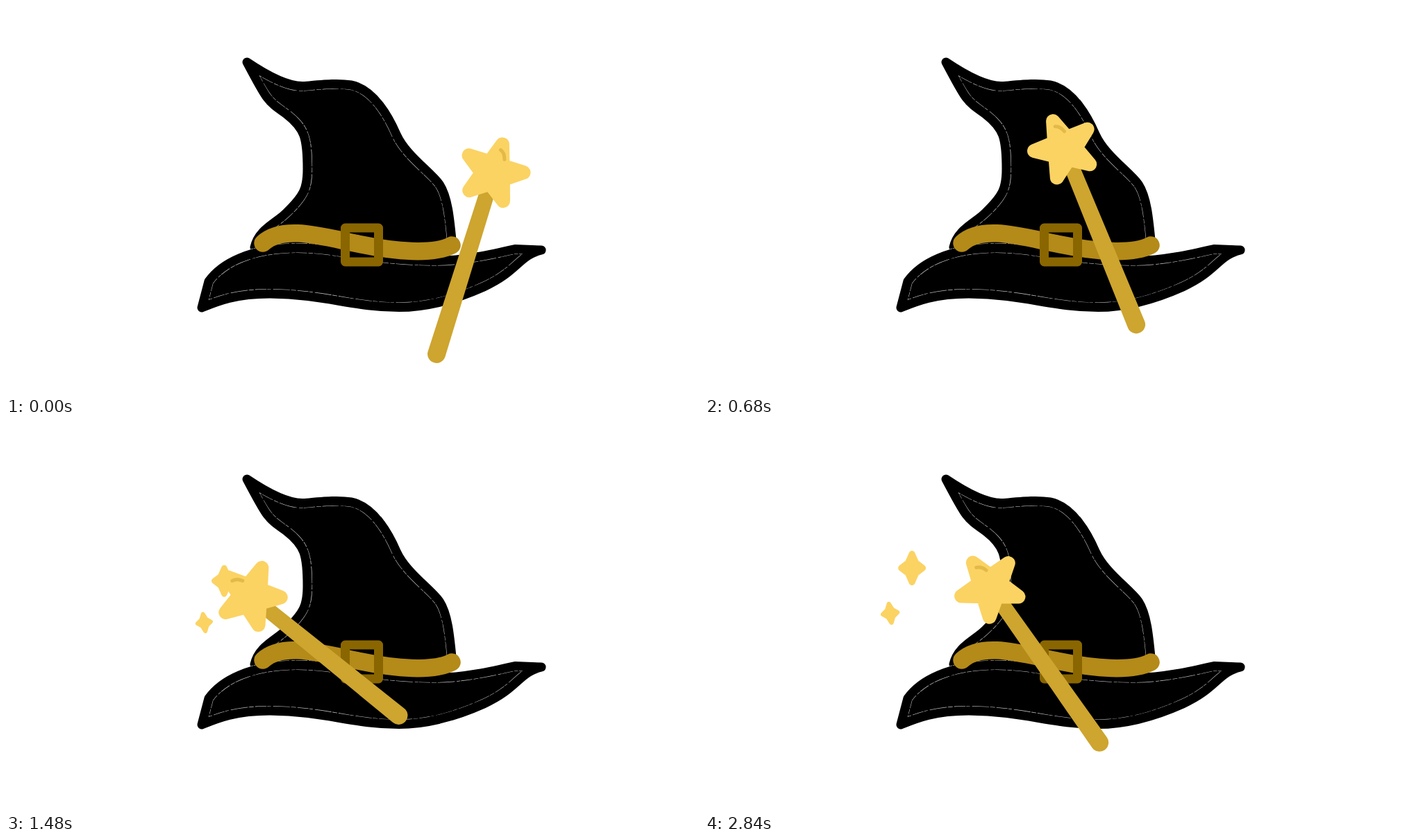
Write an HTML page that moves like this. It is 998 by 561 pixels and loops after 3000 ms.

```html
<!DOCTYPE html>
<html lang="en">
<head>
<meta charset="utf-8">
<title>Hat and wand</title>
<style>
  html, body { margin: 0; width: 100%; height: 100%; overflow: hidden; background: #fff; }
  svg { display: block; width: 100%; height: 100%; stroke-linecap: round; stroke-linejoin: round; }
  .seam { stroke: #fff; stroke-width: 14.2; stroke-opacity: .75; stroke-linecap: butt; stroke-dasharray: 16 2 7 1.5 24 3 5 1; }
  .edge { fill: none; stroke: #000; stroke-width: 13; }
  .gold { fill: #fbd363; stroke: #fbd363; }
</style>
</head>
<body>
<svg viewBox="0 0 998 561">
  <defs>
    <path id="cone" d="M358 348C364 322 388 314 404 298C430 273 434 262 434 235C434 190 430 176 404 156
      C376 136 377 138 347 81C384 106 410 117 430 115.500C462 112.500 480 111 497 114
      C530 120 552 162 562 185C576 216 610 238 624 257C636 275 639 305 643 348"/>
    <path id="brim" d="M282 435L292 397C310 372 350 349 420 349C480 349 520 367 620 367.500
      C660 367 700 358 733 350.500L771 352C738 360 738 382 688 405C650 422 610 434.500 566 434.500
      C500 434.500 460 416 380 415C330 415 304 426 282 435Z"/>
  </defs>
  <use href="#cone" class="seam"/>
  <use href="#cone" class="edge"/>
  <use href="#brim" class="seam"/>
  <use href="#brim" class="edge"/>
  <path d="M370 342C400 314 460 334 512 344C560 354 615 359 642 345" fill="none" stroke="#b48a18" stroke-width="25.5"/>
  <rect x="488.5" y="320" width="48" height="49" fill="none" stroke="#8a6600" stroke-width="13"/>
  <g id="sparkles" class="gold">
    <path id="big" stroke-width="9" transform="translate(297.5 208.5)"/>
    <path id="small" stroke-width="6.5" transform="translate(266 274) rotate(-8)"/>
  </g>
  <g id="wand">
    <path d="M-11 -95H11L13 155A13 13 0 0 1 -13 155Z" fill="#cda52f"/>
    <g transform="translate(0 -119)">
      <path id="star" class="gold" stroke-width="20"/>
      <path d="M0 -34.500Q7 -32 9.500 -23" fill="none" stroke="#e3b948" stroke-width="5"/>
    </g>
  </g>
</svg>
<script>
const $ = id => document.getElementById(id);

// Star outline: n tips on an ellipse, valleys at the given share of the radius
function starPath(n, rx, ry, valley) {
  const points = Array.from({ length: 2 * n }, (_, i) => {
    const a = i * Math.PI / n, k = i % 2 ? valley : 1;
    return `${rx * k * Math.sin(a)} ${-ry * k * Math.cos(a)}`;
  });
  return `M${points.join('L')}Z`;
}
$('star').setAttribute('d', starPath(5, 43.5, 43, .39));
$('big').setAttribute('d', starPath(4, 15.5, 20.5, .52));
$('small').setAttribute('d', starPath(4, 10.5, 13.5, .52));

const LOOP = 3000, STEP = 40, LAST = 2840;
const TURN = 1350, REST = 1680;
const PULSE = 985, LOW = .886;

const mix = (a, b, u) => a + (b - a) * u;

// Curved sweep to the left, then a straight swing back to rest
function wandPose(t) {
  const u = Math.min(1, t / TURN);
  const v = Math.min(1, Math.max(0, (t - TURN) / (REST - TURN)));
  const x = mix(666.4, 423, u ** 1.24);
  const y = 354 - 116 * u + 80 * u * u;
  const angle = mix(17.4, -61.3, u);
  return [mix(x, 479, v), mix(y, 334, v), mix(angle, -35.1, v)];
}

// Triangle wave that starts small at the turn
function sparkleScale(t) {
  const phase = (t - TURN) / PULSE % 1;
  return mix(1, LOW, Math.abs(1 - 2 * phase));
}

function render(ms) {
  const t = Math.min(LAST, Math.floor(ms % LOOP / STEP) * STEP);
  const [x, y, angle] = wandPose(t);
  $('wand').setAttribute('transform', `translate(${x} ${y}) rotate(${angle})`);
  $('sparkles').setAttribute('transform', `translate(497 439) scale(${sparkleScale(t)}) translate(-497 -439)`);
  $('sparkles').setAttribute('visibility', t < TURN ? 'hidden' : 'visible');
}

const start = performance.now();
function tick() {
  render(performance.now() - start);
  requestAnimationFrame(tick);
}
tick();
</script>
</body>
</html>
```
